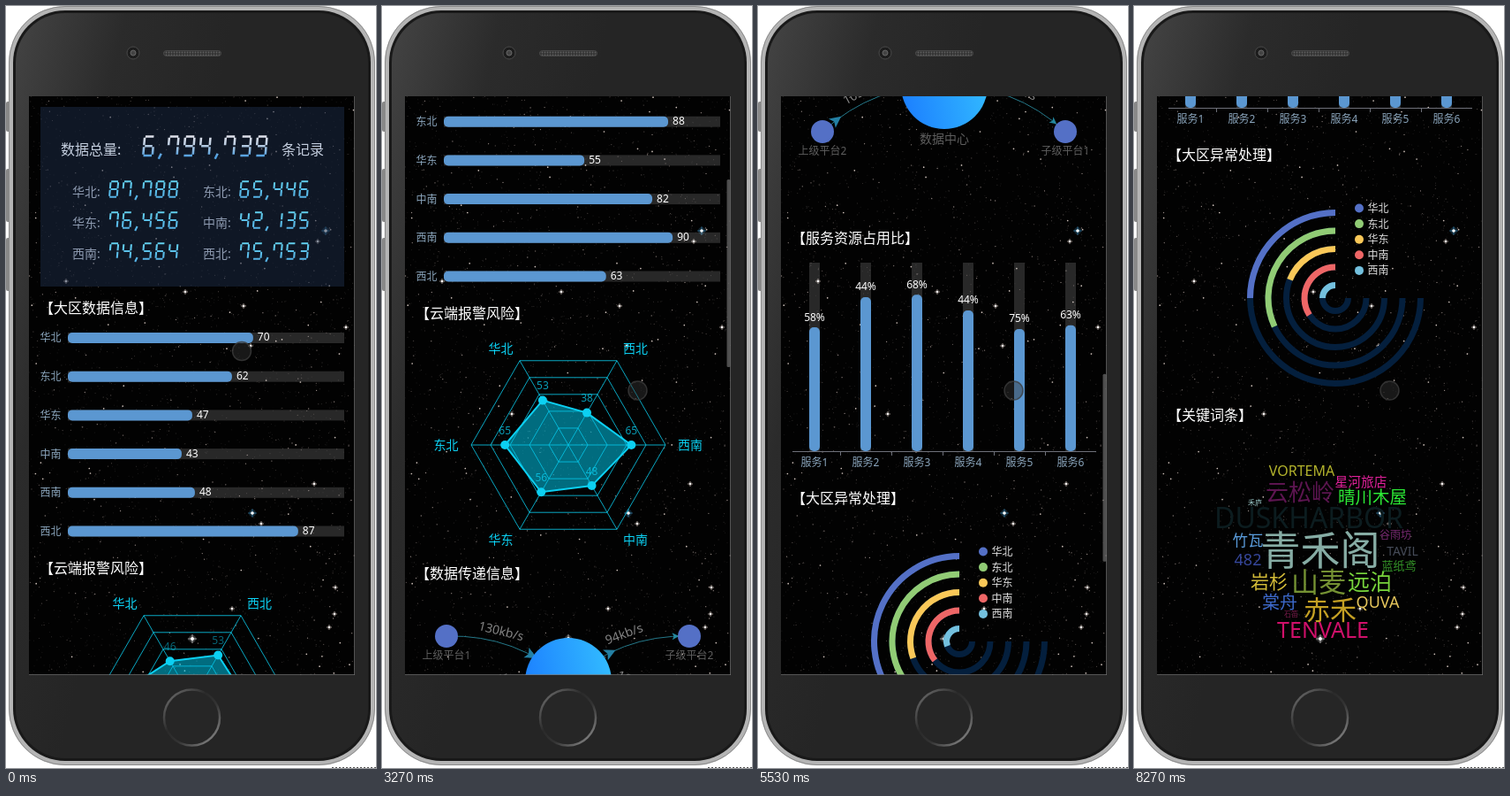
Write an HTML page that moves like this. It is 419 px wide and 861 px high and loops after 8350 ms.

```html
<!DOCTYPE html>
<html lang="zh">
<head>
<meta charset="utf-8">
<title>数据大屏</title>
<style>
html, body { margin: 0; width: 100%; height: 100%; overflow: hidden; background: #fff; }
svg { display: block; }
text { font-family: "Noto Sans", "Noto Sans CJK SC", "Noto Sans CJK", sans-serif; }
</style>
</head>
<body>
<svg id="stage" width="419" height="861" viewBox="0 0 419 861">
  <defs>
    <linearGradient id="body" x1="0" y1="0" x2=".5" y2=".25">
      <stop offset="0" stop-color="#444"/><stop offset=".5" stop-color="#2b2b2b"/><stop offset="1" stop-color="#252525"/>
    </linearGradient>
    <linearGradient id="home" x1="0" y1="0" x2="1" y2="1">
      <stop offset="0" stop-color="#777"/><stop offset=".4" stop-color="#2a2a2a"/>
      <stop offset=".6" stop-color="#333"/><stop offset="1" stop-color="#999"/>
    </linearGradient>
    <linearGradient id="hub" x1="0" y1=".6" x2="1" y2=".4">
      <stop offset="0" stop-color="#1c80ff"/><stop offset="1" stop-color="#32baff"/>
    </linearGradient>
    <linearGradient id="big" gradientUnits="userSpaceOnUse" x1="0" y1="0" x2="0" y2="20">
      <stop offset="0" stop-color="#e2e2ea"/><stop offset=".45" stop-color="#b9cbe0"/><stop offset="1" stop-color="#4e9fe0"/>
    </linearGradient>
    <linearGradient id="small" gradientUnits="userSpaceOnUse" x1="0" y1="0" x2="0" y2="20">
      <stop offset="0" stop-color="#62d0ee"/><stop offset="1" stop-color="#55b2e6"/>
    </linearGradient>
    <pattern id="mesh" width="3" height="3" patternUnits="userSpaceOnUse">
      <rect width="3" height="3" fill="#333"/><circle cx="1.5" cy="1.5" r=".9" fill="#606060"/>
    </pattern>
  </defs>
  <g fill="#888">
    <rect y="108" width="5" height="34" rx="2"/>
    <rect y="184" width="5" height="60" rx="2"/>
    <rect y="262" width="5" height="60" rx="2"/>
  </g>
  <rect x="3" y="0" width="415" height="858" rx="64" fill="#b4b4b4"/>
  <rect x="3.5" y=".5" width="414" height="857" rx="63.5" fill="none" stroke="#8c8c8c"/>
  <rect x="8" y="5" width="405" height="848" rx="59" fill="#191919"/>
  <rect x="11" y="8" width="399" height="842" rx="56" fill="url(#body)"/>
  <circle cx="144" cy="53" r="7" fill="#1c1c1c" stroke="#484848"/>
  <circle cx="144" cy="53" r="3" fill="#444" stroke="#666"/>
  <rect x="178.500" y="50.500" width="65" height="6" rx="3" fill="url(#mesh)" stroke="#484848"/>
  <circle cx="210.500" cy="804" r="31.500" fill="#262626" stroke="url(#home)" stroke-width="2.500"/>
  <path d="M369 860.500H419" stroke="#555" stroke-dasharray="2 2"/>
  <svg id="screen" x="26" y="102" width="369" height="654" viewBox="26 102 369 654">
    <rect x="26" y="102" width="369" height="654" fill="#020202"/>
    <g id="sky"/>
    <g id="page"/>
    <rect id="thumb" x="390.500" width="4" height="212" rx="1.500" fill="#999" opacity=".5"/>
    <path d="M394.500 102V756M26 755.500H395" stroke="#777" stroke-opacity=".7"/>
    <circle id="cursor" r="10.500" fill="#333" fill-opacity=".45" stroke="#3c3c3c" stroke-opacity=".8" stroke-width="1.500"/>
  </svg>
</svg>
<script>
const LOOP = 8350, TOP = 102, VIEW = 654, MAX_SCROLL = 1349, NOTCH = 112.9;
const $ = id => document.getElementById(id);
const page = $('page'), sky = $('sky');

function add(parent, tag, attrs) {
  const el = document.createElementNS('http://www.w3.org/2000/svg', tag);
  return parent.appendChild(set(el, attrs));
}
function set(el, attrs) {
  for (const k in attrs) el.setAttribute(k, attrs[k]);
  return el;
}
// y is the optical middle of the line
function text(str, x, y, size, fill, anchor = 'middle', parent = page) {
  const el = add(parent, 'text', { x, y: y + size * .37, 'font-size': size, fill, 'text-anchor': anchor });
  el.textContent = str;
  return el;
}
const mix = (a, b, k) => a + (b - a) * k;
const clamp = v => Math.max(0, Math.min(1, v));

// starfield
let seed = 20;
const rnd = () => (seed = seed * 16807 % 2147483647) / 2147483647;
function dots(n, size, color) {
  let d = '';
  while (n--) d += `M${(26 + rnd() * 369).toFixed(1)} ${(TOP + rnd() * VIEW).toFixed(1)}h0`;
  add(sky, 'path', { d, stroke: color, 'stroke-width': size, 'stroke-linecap': 'round' });
}
dots(2200, 1, '#1d1b1b');
dots(1000, 1, '#383433');
dots(420, 1.1, '#5c5350');
dots(190, 1.3, '#8f837f');
dots(75, 1.7, '#cabdb6');
function glint(x, y, r, color) {
  add(sky, 'circle', { cx: x, cy: y, r: r * 1.3, fill: color, opacity: .2 });
  add(sky, 'path', { d: `M${x - r * 1.6} ${y}h${r * 3.2}M${x} ${y - r * 1.6}v${r * 3.2}`, stroke: color, opacity: .6 });
  add(sky, 'circle', { cx: x, cy: y, r: r * .6, fill: '#fff' });
}
[[362, 254], [279, 573]].forEach(p => glint(...p, 3, '#4aa8e0'));
glint(211, 715, 3.2, '#fff');
[[68, 311], [203, 323], [269, 339], [147, 461], [373, 657], [366, 702], [372, 687], [385, 363],
 [277, 384], [256, 681], [353, 266], [349, 540], [289, 585]].forEach(p => glint(...p, 1.9, '#d8c8c0'));

// seven-segment numbers
const SEG = {
  a: 'M1.8 1.2H9.6', b: 'M9.8 2.2V9.200', c: 'M9.8 10.800V17.800', d: 'M1.4 18.800H9.200',
  e: 'M1.2 10.800V17.800', f: 'M1.2 2.200V9.200', g: 'M2 10H9'
};
const LIT = ['abcdef', 'bc', 'abged', 'abgcd', 'fgbc', 'afgcd', 'afgedc', 'fabc', 'abcdefg', 'abcdfg'];
function lcd(str, x, y, scale, grad) {
  const g = add(page, 'g', { transform: `translate(${x} ${y}) scale(${scale})`, stroke: `url(#${grad})`, 'stroke-width': 2.1 });
  let at = 0;
  for (const ch of str) {
    const comma = ch === ',';
    const d = comma ? 'M4.500 17L2.500 22' : [...LIT[ch]].map(s => SEG[s]).join('');
    add(g, 'path', { d, transform: `translate(${at + (comma ? 0 : 1.5)}) skewX(-5)` });
    at += comma ? 8 : 14.8;
  }
}

// summary panel
add(page, 'rect', { x: 39, y: 114, width: 344, height: 203, fill: '#1c2c48', 'fill-opacity': .5 });
text('数据总量:', 62, 162, 16, '#c4cede', 'start');
lcd('6,794,739', 154, 146, 1.22, 'big');
text('条记录', 312, 162, 16, '#c4cede', 'start');
[['华北', '87,788'], ['东北', '65,446'], ['华东', '76,456'], ['中南', '42,135'], ['西南', '74,564'], ['西北', '75,753']]
  .forEach(([name, num], i) => {
    const x = i % 2 * 148, y = (i >> 1) * 35;
    text(name + ':', 75 + x, 210 + y, 14, '#8d9ab0', 'start');
    lcd(num, 116 + x, 197 + y, 1, 'small');
  });

['大区数据信息', '云端报警风险', '数据传递信息', '服务资源占用比', '大区异常处理', '关键词条']
  .forEach((s, i) => text(`【${s}】`, 38, 341 + 294 * i, 16, '#fff', 'start'));

// data refreshes every three seconds
const REFRESH = [-485, 2515, 5515];
function blend(sets, t) {
  let i = 2;
  while (i && t < REFRESH[i]) i--;
  const age = clamp((t - REFRESH[i]) / 1000);
  const now = sets[Math.min(i, sets.length - 1)], old = sets[Math.max(0, Math.min(i - 1, sets.length - 1))];
  const k = 1 - (1 - age) ** 3;
  return { now, age, at: now.map((v, j) => mix(old[j], v, k)) };
}
const ratios = list => list.map(v => v / (Math.max(...list) * 1.2));

// horizontal bars
const barSets = [[70, 62, 47, 43, 48, 87], [76, 88, 55, 82, 90, 63]];
const bars = ['华北', '东北', '华东', '中南', '西南', '西北'].map((name, i) => {
  const y = 375 + 43.7 * i;
  text(name, 50.5, y, 12, '#8ba6bd');
  add(page, 'rect', { x: 70, y: y - 6, width: 313, height: 12, fill: '#fff', 'fill-opacity': .15 });
  return {
    rect: add(page, 'rect', { x: 70, y: y - 6, height: 12, rx: 5, fill: '#5b97d1' }),
    label: text('', 0, y - 1, 12, '#fff', 'start')
  };
});
function drawBars(t) {
  const { now } = blend(barSets, t), { at } = blend(barSets.map(ratios), t);
  bars.forEach(({ rect, label }, i) => {
    const w = at[i] * 313;
    set(rect, { width: w });
    set(label, { x: 75 + w });
    label.textContent = now[i];
  });
}

// radar
const RX = 211, RY = 784, CYAN = '#0cd0f2';
const polar = (i, r) => [RX + r * Math.cos(i * Math.PI / 3), RY - r * Math.sin(i * Math.PI / 3)];
const hexagon = rs => rs.map((r, i) => polar(i, r).map(v => v.toFixed(2))).join(' ');
for (let k = 1; k <= 5; k++)
  add(page, 'polygon', { points: hexagon(Array(6).fill(22 * k)), fill: 'none', stroke: CYAN, 'stroke-opacity': .8 });
for (let i = 0; i < 3; i++) {
  const [x1, y1] = polar(i, 110), [x2, y2] = polar(i + 3, 110);
  add(page, 'line', { x1, y1, x2, y2, stroke: CYAN, 'stroke-opacity': .8 });
}
[['西南', 349, 784], ['西北', 287, 675], ['华北', 134.5, 675], ['东北', 72.5, 784], ['华东', 134.5, 891], ['中南', 287, 891]]
  .forEach(([s, x, y]) => text(s, x, y, 14, CYAN));
const radarSets = [[56, 53, 46, 85, 50, 70], [65, 38, 53, 65, 56, 48]];
const area = add(page, 'polygon', { fill: '#00c4e6', 'fill-opacity': .55, stroke: CYAN, 'stroke-width': 2 });
const marks = radarSets[0].map(() => ({
  dot: add(page, 'circle', { r: 5, fill: CYAN }),
  label: text('', 0, 0, 12, CYAN)
}));
function drawRadar(t) {
  const { now, at, age } = blend(radarSets, t), rs = at.map(v => v * 1.1);
  set(area, { points: hexagon(rs) });
  marks.forEach(({ dot, label }, i) => {
    const [x, y] = polar(i, rs[i]);
    set(dot, { cx: x, cy: y });
    set(label, { x, y: y - 12.5, opacity: age });
    label.textContent = now[i];
  });
}

// platform links: curved edges with travelling arrows
const HUB = [211, 1051];
const links = [
  { from: [73, 1000], to: HUB, rate: '130kb/s', label: [135, 994, 14], phase: .957, tip: .7 },
  { from: [73, 1103], to: HUB, rate: '105kb/s', label: [120, 1056, -28], phase: .941, tip: .66 },
  { from: HUB, to: [348, 1000], rate: '94kb/s', label: [274, 997, -20], phase: .677, tip: .92 },
  { from: HUB, to: [348, 1103], rate: '104kb/s', label: [291, 1053, 23], phase: .807, tip: .91 }
];
function along({ from: [x1, y1], to: [x2, y2], ctrl: [cx, cy] }, p) {
  const q = 1 - p;
  const x = q * q * x1 + 2 * q * p * cx + p * p * x2, y = q * q * y1 + 2 * q * p * cy + p * p * y2;
  const dx = q * (cx - x1) + p * (x2 - cx), dy = q * (cy - y1) + p * (y2 - cy);
  return `translate(${x} ${y}) rotate(${Math.atan2(dy, dx) * 180 / Math.PI})`;
}
for (const link of links) {
  const { from: [x1, y1], to: [x2, y2], label: [x, y, turn] } = link;
  link.ctrl = [(x1 + x2) / 2 - (y1 - y2) * .2, (y1 + y2) / 2 - (x2 - x1) * .2];
  add(page, 'path', { d: `M${x1} ${y1}Q${link.ctrl} ${x2} ${y2}`, fill: 'none', stroke: '#247889' });
  add(page, 'path', { d: 'M1 0L-7 -4L-5 0L-7 4Z', fill: '#24889f', transform: along(link, link.tip) });
  set(text(link.rate, x, y, 14, '#858585'), { transform: `rotate(${turn} ${x} ${y})` });
  link.arrow = add(page, 'path', { d: 'M7 0L-6 -6.500L-3 0L-6 6.500Z', fill: '#2480a4' });
}
[['上级平台1', 73, 1000], ['上级平台2', 73, 1103], ['子级平台2', 348, 1000], ['子级平台1', 348, 1103]]
  .forEach(([s, cx, cy]) => {
    add(page, 'circle', { cx, cy, r: 13, fill: '#5470c6' });
    text(s, cx, cy + 22, 12, '#5e5e5e');
  });
add(page, 'circle', { cx: HUB[0], cy: HUB[1], r: 49, fill: 'url(#hub)' });
text('数据中心', 211, 1111, 14, '#5e5e5e');
function drawLinks(t) {
  for (const link of links) set(link.arrow, { transform: along(link, (link.phase + t / 4650) % 1) });
}

// service columns
const BASE = 1464, COL = 213;
const colSets = [[71, 90, 90, 82, 69, 72], [71, 90, 90, 82, 69, 72], [58, 44, 68, 44, 75, 63]];
const cols = colSets[0].map((_, i) => {
  const x = 64 + 58 * i;
  add(page, 'rect', { x: x - 6, y: BASE - COL, width: 12, height: COL, fill: '#fff', 'fill-opacity': .15 });
  text('服务' + (i + 1), x, BASE + 13, 12, '#8ba6bd');
  return {
    rect: add(page, 'rect', { x: x - 6, width: 12, rx: 5, fill: '#5b97d1' }),
    label: text('', x, 0, 12, '#fff')
  };
});
add(page, 'path', { d: `M39 ${BASE + .5}H383M93.500 ${BASE}v5m58 -5v5m58 -5v5m58 -5v5m58 -5v5`, stroke: '#6e7079', fill: 'none' });
function drawCols(t) {
  const { now } = blend(colSets, t), { at } = blend(colSets.map(ratios), t);
  cols.forEach(({ rect, label }, i) => {
    const h = at[i] * COL;
    set(rect, { y: BASE - h, height: h });
    set(label, { y: BASE - h - 7.5 });
    label.textContent = now[i] + '%';
  });
}

// ring gauges, angles run counter-clockwise from the top
const PALETTE = ['#5470c6', '#91cc75', '#fac858', '#ee6666', '#73c0de'];
const ringSets = [[130, 130, 112, 128, 112], [130, 130, 112, 128, 112], [90, 115, 68, 123, 90]];
function arc(r, deg) {
  const a = deg * Math.PI / 180;
  return `M228 ${1679 - r}A${r} ${r} 0 ${+(deg > 180)} 0 ${228 - r * Math.sin(a)} ${1679 - r * Math.cos(a)}`;
}
const rings = PALETTE.map((color, i) => {
  const r = 96.5 - 20.5 * i, style = { fill: 'none', 'stroke-width': 7 };
  add(page, 'path', { d: arc(r, 270), stroke: '#041f3d', ...style });
  add(page, 'circle', { cx: 255, cy: 1577.5 + 17.6 * i, r: 5, fill: color });
  text(['华北', '东北', '华东', '中南', '西南'][i], 264.5, 1577.5 + 17.6 * i, 12, '#ddd', 'start');
  return { r, path: add(page, 'path', { stroke: color, ...style }) };
});
function drawRings(t) {
  const { at } = blend(ringSets, t);
  rings.forEach(({ r, path }, i) => set(path, { d: arc(r, at[i]) }));
}

// word cloud
[['DUSKHARBOR', 198, 578, 32, '#0c1c1f'], ['VORTEMA', 190, 525, 16, '#b3b32c'], ['星河旅店', 257, 538, 14.7, '#e0209a'],
 ['云松岭', 188, 549, 26, '#5c1550'], ['晴川木屋', 270, 555, 19.5, '#2cea36'], ['禾庐', 137, 561, 8, '#9ccaca'],
 ['竹瓦', 129, 604, 17.5, '#5a9cdc'], ['青禾阁', 211, 615, 45, '#86aca4'], ['谷雨坊', 296, 598, 12, '#74286e'],
 ['TAVIL', 304, 616, 14, '#454b58'], ['482', 129, 625, 18, '#35469a'], ['蓝纸鸢', 300, 632, 13, '#349428'],
 ['岩杉', 153, 650, 21, '#d4bc38'], ['山麦', 209, 651, 31, '#759233'], ['远泊', 267, 651, 25, '#78d43c'],
 ['棠舟', 165, 674, 20, '#3c68c8'], ['石笛', 178, 687, 8, '#7a1c4c'], ['赤禾', 222, 682, 30, '#c4a024'],
 ['QUVA', 276, 673, 18, '#e6c65c'], ['TENVALE', 214, 705, 25, '#d0106a']]
  .forEach(([s, x, y, size, color]) => text(s, x, y + MAX_SCROLL, size, color));

// wheel notches: time and share covered by the first step
const NOTCHES = [[1860, .5], [2320, .5], [3270, .55], [3640, .5], [4060, .54], [4430, .5],
  [4820, .5], [5170, .5], [5530, .51], [5690, .37], [6080, .5], [6850, .5]];
function scrollAt(t) {
  const sum = NOTCHES.reduce((s, [at, first]) => {
    const e = t - at;
    return s + (e < 0 ? 0 : e < 70 ? first : e < 145 ? .92 : 1);
  }, 0);
  return Math.min(MAX_SCROLL, Math.round(sum * NOTCH));
}

function draw() {
  const t = performance.now() % LOOP, s = scrollAt(t);
  set(page, { transform: `translate(0 ${-s})` });
  set($('thumb'), {
    y: TOP + s * VIEW / (MAX_SCROLL + VIEW),
    opacity: t < 1860 ? 0 : .5 * (1 - clamp((t - 7520) / 280))
  });
  const k = clamp((t - 240) / 380), m = k * k * (3 - 2 * k);
  set($('cursor'), { cx: mix(267, 289.5, m), cy: mix(390, 434.5, m) });
  [drawBars, drawRadar, drawLinks, drawCols, drawRings].forEach(f => f(t));
  requestAnimationFrame(draw);
}
draw();
</script>
</body>
</html>
```
